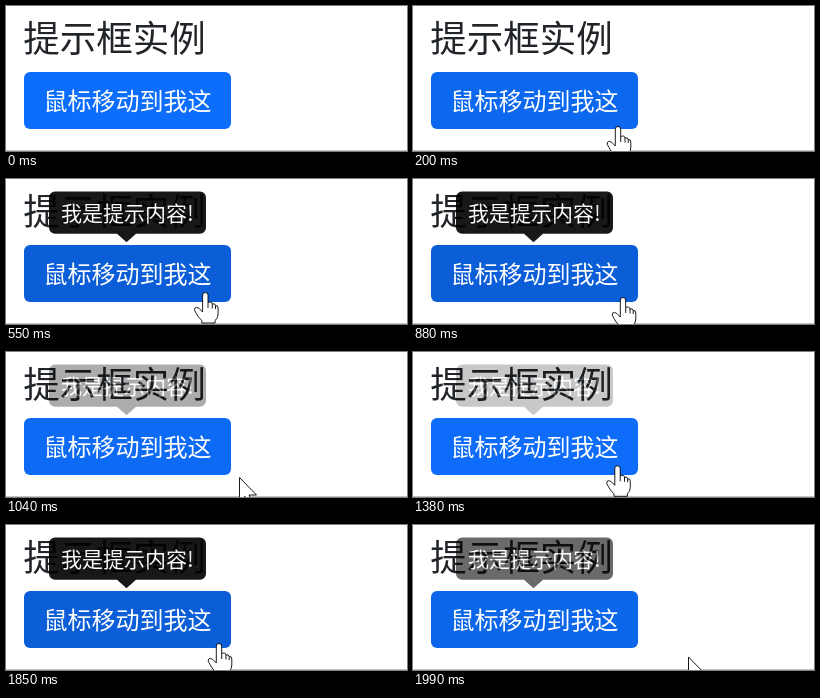
Write an HTML page that moves like this. It is 401 px wide and 145 px high and loops after 2060 ms.

```html
<!DOCTYPE html>
<html lang="zh-CN">
<head>
<meta charset="utf-8">
<title>提示框实例</title>
<style>
  html, body { margin: 0; width: 100%; height: 100%; overflow: hidden; background: #fff; }
  svg { display: block; width: 401px; height: 145px; }
  text { font-family: "Noto Sans CJK SC", "Noto Sans CJK", "Noto Sans", sans-serif; }
  .light { fill: #fff; font-weight: 500; }
</style>
</head>
<body>
<svg viewBox="0 0 401 145">
  <text x="17.2" y="46" font-size="36.5" fill="#212529">提示框实例</text>
  <rect id="button" x="18" y="66" width="207" height="57" rx="6"/>
  <text class="light" x="37.5" y="103.8" font-size="24">鼠标移动到我这</text>
  <rect y="144" width="401" height="1" fill="#c4c4c4"/>
  <g id="tooltip">
    <path d="M49 12.5H194a6 6 0 0 1 6 6V48.7a6 6 0 0 1-6 6H130L120.5 63.2 111 54.7H49a6 6 0 0 1-6-6V18.5a6 6 0 0 1 6-6Z"/>
    <text class="light" x="55" y="41.5" font-size="21">我是提示内容!</text>
  </g>
  <g fill="#fff" stroke="#000" stroke-width=".9" stroke-linejoin="round">
    <path id="arrow" d="M.5 .5V24.5L6 19.3 9.6 27.5 13.4 25.8 10 18H17.5Z"/>
    <g id="hand">
      <path d="M-2.7 18.5V3Q-2.7 .5 0 .5T2.7 3V10.5Q6.7 9 7 12Q10 11 10.2 13.6Q12.8 13 12.8 16V22Q12.8 26 9.8 28.5V31H-3.5V28.5Q-7.5 25-9 21.5L-10.7 18.5Q-11.3 15.5-8.7 15.3Q-6.5 15.3-2.7 20Z"/>
      <path d="M2.7 10.5V16M7 12V16.5M10.2 13.6V17" fill="none"/>
    </g>
  </g>
</svg>
<script>
const LOOP = 2060;
const BLUE = [13, 110, 253], HOVER_BLUE = [11, 94, 215];

// start ms, cursor, x, y, tooltip opacity, hover amount
const poses = [
  [0, '', 0, 0, 0, 0],
  [70, 'arrow', 208, 132, 0, 0],
  [140, 'hand', 205, 120, 0, .4],
  [210, 'hand', 203, 117, .38, .9],
  [270, 'hand', 202, 116, .77, 1],
  [340, 'hand', 201, 115, .9, 1],
  [410, 'hand', 200, 114, .9, 1],
  [550, 'hand', 199.3, 113, .9, 1],
  [810, 'hand', 204, 115, .9, 1],
  [880, 'hand', 210, 118, .9, 1],
  [950, 'arrow', 228, 124, .75, .7],
  [1040, 'arrow', 233, 125, .32, .25],
  [1110, 'arrow', 233, 125, 0, 0],
  [1310, 'hand', 210, 116, 0, 0],
  [1380, 'hand', 204.5, 113.3, .21, .1],
  [1450, 'hand', 204.2, 113.3, .65, .7],
  [1520, 'hand', 204, 113.3, .9, 1],
  [1850, 'hand', 213, 118, .9, 1],
  [1920, 'arrow', 248, 126, .85, .9],
  [1990, 'arrow', 275, 131.5, .58, .5]
];

const byId = id => document.getElementById(id);
const button = byId('button'), tooltip = byId('tooltip');
const cursors = [byId('arrow'), byId('hand')];

function mix(from, to, amount) {
  return `rgb(${from.map((v, i) => Math.round(v + (to[i] - v) * amount))})`;
}

function render(time) {
  const [, kind, x, y, opacity, hover] = poses.findLast(pose => pose[0] <= time);
  button.setAttribute('fill', mix(BLUE, HOVER_BLUE, hover));
  tooltip.setAttribute('opacity', opacity);
  for (const cursor of cursors) {
    cursor.setAttribute('visibility', cursor.id === kind ? 'visible' : 'hidden');
    cursor.setAttribute('transform', `translate(${x} ${y})`);
  }
}

const start = performance.now();
function tick() {
  render((performance.now() - start) % LOOP);
  requestAnimationFrame(tick);
}
tick();
</script>
</body>
</html>
```
